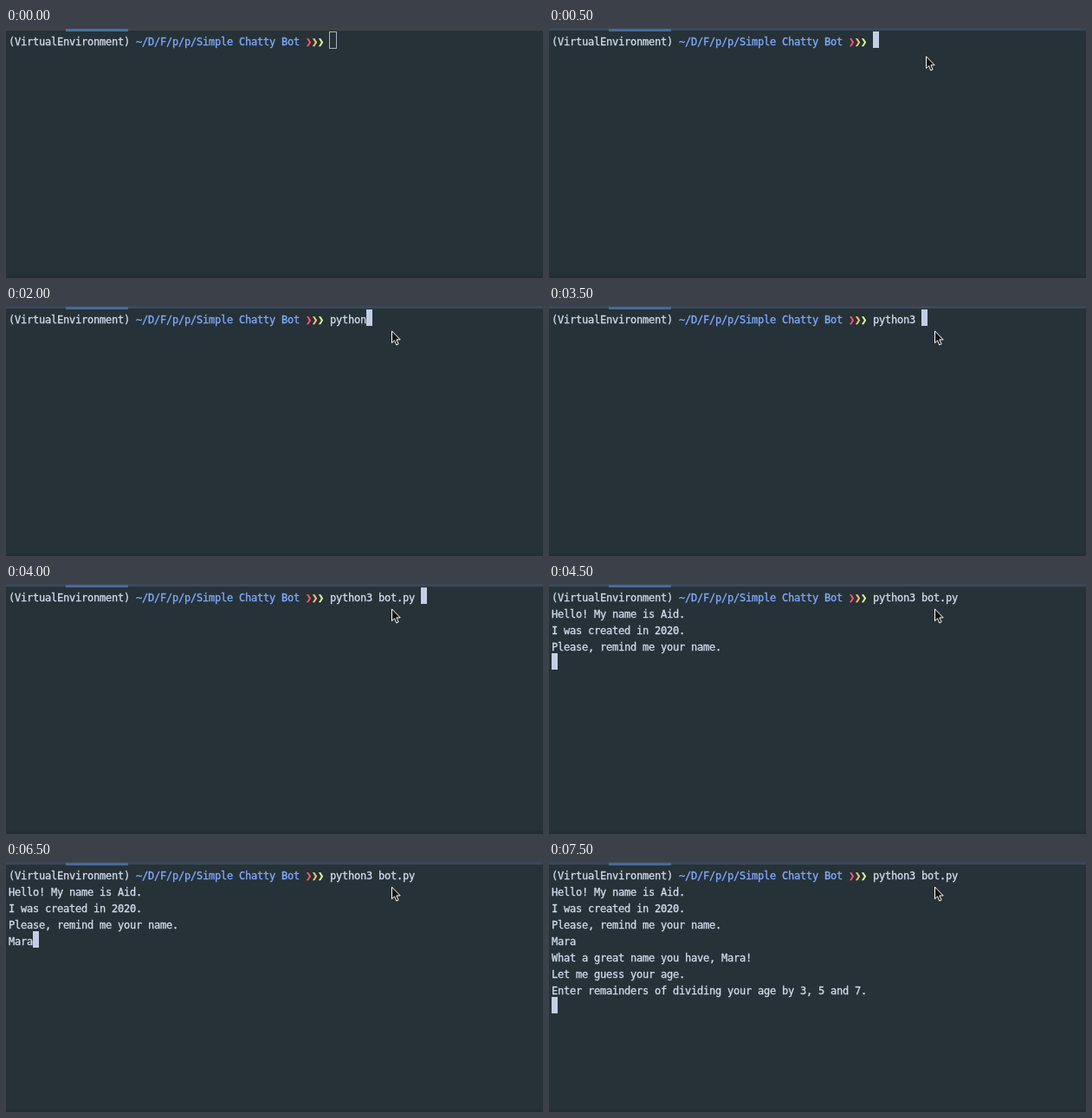
An HTML page for the animation above (8 s loop, 620 by 289 pixels).

```html
<!DOCTYPE html>
<html lang="en">
<head>
<meta charset="utf-8">
<title>Terminal chat bot</title>
<style>
html, body { margin: 0; width: 100%; height: 100%; overflow: hidden; background: #263238; }
#stage { position: relative; width: 620px; height: 289px; overflow: hidden; background: #263238; }
#stage > * { position: absolute; }
#bar { left: 0; top: 0; width: 620px; height: 3px; background: #3c4858; }
#tab { left: 69px; top: 1px; width: 72px; height: 3px; background: #48699a; }
.idle #bar { background: #404347; }
.idle #tab { background: #4870a8; }
#foot { left: 0; bottom: 0; width: 620px; height: 3px; background: #232e33; }
#text {
  left: 3px; top: 7px; color: #d3dcec; white-space: pre;
  font: 12px/19px "DejaVu Sans Mono", monospace; letter-spacing: calc(7px - 1ch);
  -webkit-text-stroke: .3px currentColor;
}
#text div { height: 19px; }
.path { color: #82aaff; }
.mark { display: inline-block; width: 7px; height: 19px; vertical-align: top; }
#caret { box-sizing: border-box; width: 7px; height: 19px; background: #c3cee6; }
.idle #caret { width: 9px; height: 20px; margin: 0 0 0 -1px; background: none; border: 1px solid #a9b4c2; }
#mouse { left: 0; top: 0; overflow: visible; }
</style>
</head>
<body>
<div id="stage">
  <div id="bar"></div>
  <div id="tab"></div>
  <div id="foot"></div>
  <div id="text"><div>(VirtualEnvironment) <span class="path">~/D/F/p/p/Simple Chatty Bot</span> <span class="mark" style="color:#ff5370">❯</span><span class="mark" style="color:#ffcb6b">❯</span><span class="mark" style="color:#ddffa7">❯</span> <span id="command"></span></div><div id="output"></div></div>
  <div id="caret"></div>
  <svg id="mouse" width="12" height="19">
    <path d="M.5 .9V14.7L3.6 11.8L5.7 17L8.1 16L5.9 10.9H10.2Z"
      fill="#111" stroke="#fff" stroke-linejoin="round"/>
  </svg>
</div>
<script>
const LOOP = 8000, CELL = 7, ROW = 19, LEFT = 3, TOP = 4, PROMPT = 53;
const COMMAND = "python3 bot.py ", NAME = "Mara";
const INTRO = ["Hello! My name is Aid.", "I was created in 2020.", "Please, remind me your name."];
const REPLY = [`What a great name you have, ${NAME}!`, "Let me guess your age.",
  "Enter remainders of dividing your age by 3, 5 and 7."];

// Each track lists [start time, value]; values hold until the next step.
const typed = [[0, 0], [1250, 1], [1500, 3], [1750, 5], [2000, 6], [2500, 7], [3500, 8], [4000, 15]];
const named = [[0, 0], [6250, 1], [6500, 4]];
const phase = [[0, 0], [4500, 1], [7000, 2]];
const blink = [[0, 1], [5000, 0], [5500, 1], [6000, 0], [6250, 1]];
const focus = [[0, 0], [500, 1]];
const mouse = [[0, null], [250, [435, 32]], [750, [445, 28]]];

const at = (track, t) => track.filter(step => step[0] <= t).pop()[1];
const $ = id => document.getElementById(id);
const ui = Object.fromEntries(["stage", "command", "output", "caret", "mouse"].map(id => [id, $(id)]));
const setText = (el, text) => { if (el.textContent !== text) el.textContent = text; };

function render(t) {
  const stage = at(phase, t);
  const command = COMMAND.slice(0, at(typed, t));
  const name = NAME.slice(0, at(named, t));
  const lines = stage ? [...INTRO, name] : [];
  if (stage === 2) lines.push(...REPLY);

  setText(ui.command, command);
  setText(ui.output, lines.join("\n"));
  ui.stage.className = at(focus, t) ? "" : "idle";

  const [col, row] = [[PROMPT + command.length, 0], [name.length, 4], [0, 8]][stage];
  ui.caret.style.left = LEFT + col * CELL + "px";
  ui.caret.style.top = TOP + row * ROW + "px";
  ui.caret.style.visibility = at(blink, t) ? "visible" : "hidden";

  const spot = at(mouse, t);
  ui.mouse.style.visibility = spot ? "visible" : "hidden";
  if (spot) ui.mouse.style.transform = `translate(${spot[0]}px, ${spot[1]}px)`;
}

const start = performance.now();
function tick() {
  render((performance.now() - start) % LOOP);
  requestAnimationFrame(tick);
}
tick();
</script>
</body>
</html>
```
